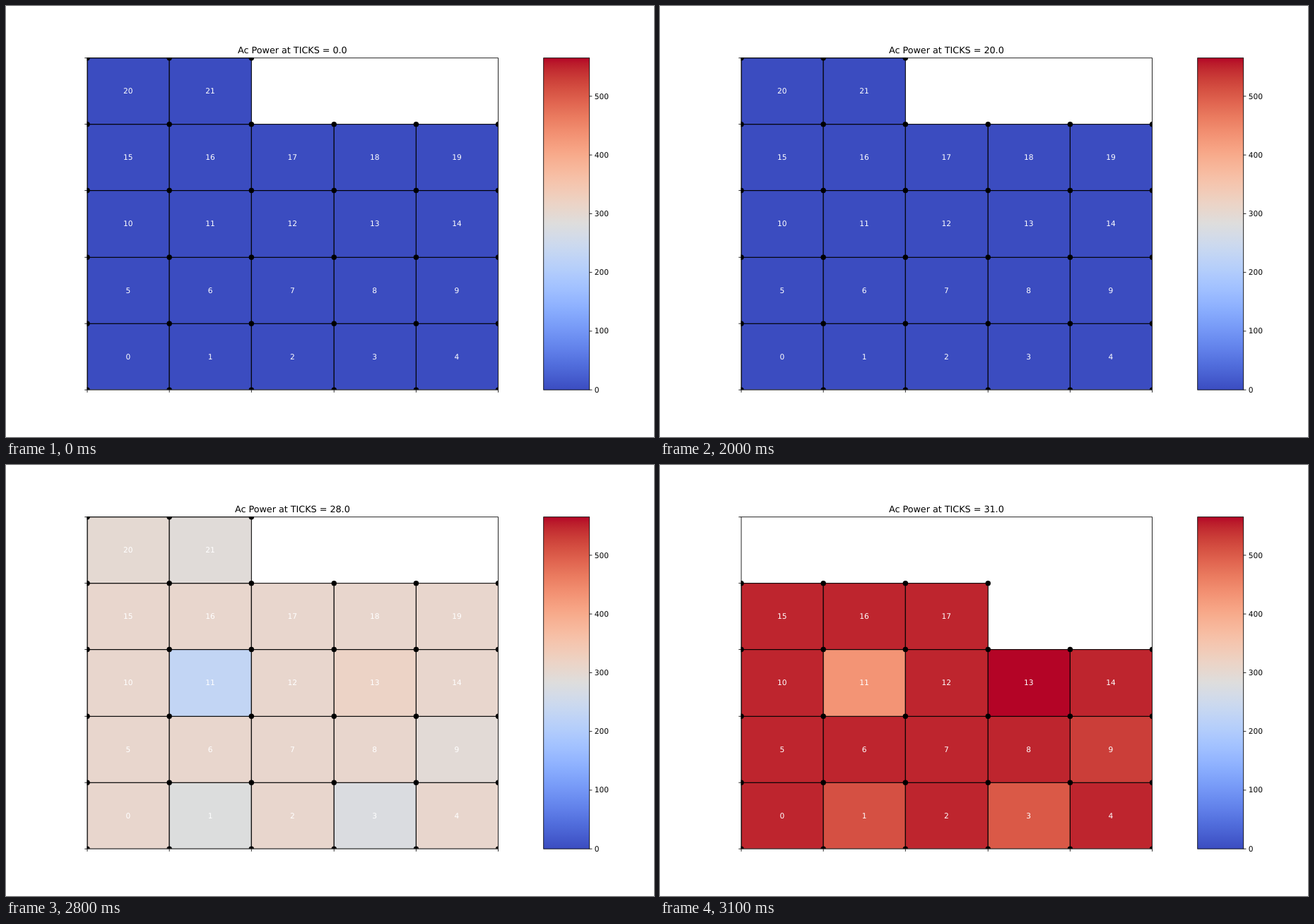
Write an HTML page that moves like this. It is 917x611 px and loops after 3200 ms.

```html
<!DOCTYPE html>
<html lang="en">
<head>
<meta charset="utf-8">
<title>Ac Power</title>
<style>
  html, body { margin: 0; width: 100%; height: 100%; overflow: hidden; background: #fff; }
  svg { display: block; width: 917px; height: 611px; }
  text { font: 13.89px "DejaVu Sans", sans-serif; text-anchor: middle; text-rendering: geometricPrecision; }
  #title { font-size: 16.67px; }
  .scale { text-anchor: start; }
  .cell text { fill: #fff; }
  .cell rect { stroke: #000; stroke-width: 1.39; }
  .axis { fill: none; stroke: #000; stroke-width: 1.11; }
</style>
</head>
<body>
<!-- Drawn on a 12 x 8 inch figure at 100 dpi, scaled to the stage -->
<svg viewBox="0 0 1200 800" preserveAspectRatio="none">
  <defs>
    <linearGradient id="ramp" x1="0" y1="1" x2="0" y2="0"></linearGradient>
    <clipPath id="plotArea"><rect x="150" y="96" width="761" height="616"/></clipPath>
  </defs>
  <g clip-path="url(#plotArea)"><g id="cells"></g><g id="dots"></g></g>
  <rect class="axis" x="150.5" y="96.5" width="761" height="616"/>
  <rect class="axis" x="995.5" y="96.5" width="85" height="616" style="fill:url(#ramp)"/>
  <g id="ticks"></g>
  <text id="title" x="530.45" y="87.7"></text>
</svg>
<script>
const TICK_MS = 100, TICKS = 32, MAX_POWER = 565.4;
const COLS = 5, ROWS = 5, CELLS = 22, CELLS_AT_END = 18;
const LEFT = 150, BOTTOM = 712, CELL_W = 152.18, CELL_H = 123.2;
const TICK_LENGTH = 4.86, TEXT_DROP = 5.07;

// Share of full power after sunrise, as [tick, share]
const sunrise = [[24, 0], [25, .03], [26, .106], [28, .562], [30, .845], [31, 1]];
// Loss at full power: most cells are alike, a few stand out
const usualLoss = .027;
const loss = { 1: .095, 3: .11, 9: .064, 11: .235, 13: 0, 20: .05, 21: .075 };

const byId = id => document.getElementById(id);
const mix = (a, b, t) => a + (b - a) * t;
const snap = v => Math.round(v) + .5;
const gridX = col => snap(LEFT + CELL_W * col);
const gridY = row => snap(BOTTOM - CELL_H * row);

function add(parent, tag, attrs, content = "") {
  const el = document.createElementNS("http://www.w3.org/2000/svg", tag);
  for (const key in attrs) el.setAttribute(key, attrs[key]);
  el.textContent = content;
  return parent.appendChild(el);
}

function labToRgb(L, a, b) {
  const cube = t => t > 6 / 29 ? t ** 3 : (t - 16 / 116) / 7.787;
  const fy = (L + 16) / 116;
  const x = .9505 * cube(fy + a / 500), y = cube(fy), z = 1.089 * cube(fy - b / 200);
  const linear = [
    3.2406 * x - 1.5372 * y - .4986 * z,
    -.9689 * x + 1.8758 * y + .0415 * z,
    .0557 * x - .204 * y + 1.057 * z
  ];
  const rgb = linear.map(c => c > .0031308 ? 1.055 * c ** (1 / 2.4) - .055 : 12.92 * c);
  return `rgb(${rgb.map(c => Math.round(255 * Math.max(0, Math.min(1, c))))})`;
}

// Diverging ramp in polar Lab: blue, through light grey, to red
function color(share) {
  const t = Math.abs(2 * share - 1);
  const size = mix(88, 80, t), tilt = 1.08 * t;
  const hue = share < .5 ? mix(-1.661, -1.1, t) : mix(1.061, .5, t);
  const chroma = size * Math.sin(tilt);
  return labToRgb(size * Math.cos(tilt), chroma * Math.cos(hue), chroma * Math.sin(hue));
}

function levelAt(tick) {
  const next = sunrise.findIndex(([t]) => t >= tick);
  if (next === 0) return 0;
  const [t0, a] = sunrise[next - 1], [t1, b] = sunrise[next];
  return mix(a, b, (tick - t0) / (t1 - t0));
}

for (let i = 0; i <= 64; i++) {
  add(byId("ramp"), "stop", { offset: i / 64, "stop-color": color(i / 64) });
}

const cells = Array.from({ length: CELLS }, (_, n) => {
  const col = n % COLS, row = Math.floor(n / COLS);
  const x = gridX(col), y = gridY(row + 1);
  const group = add(byId("cells"), "g", { class: "cell" });
  const rect = add(group, "rect", { x, y, width: gridX(col + 1) - x, height: gridY(row) - y });
  add(group, "text", {
    x: LEFT + CELL_W * (col + .5),
    y: BOTTOM - CELL_H * (row + .5) + TEXT_DROP
  }, n);
  return { group, rect, col, row, loss: loss[n] ?? usualLoss };
});

// A dot is present as soon as the first cell touching it is
const dots = [];
for (let row = 0; row <= ROWS; row++) {
  for (let col = 0; col <= COLS; col++) {
    const first = cells.findIndex(c =>
      (c.col === col || c.col + 1 === col) && (c.row === row || c.row + 1 === row));
    if (first < 0) continue;
    dots.push({ first, el: add(byId("dots"), "circle", { cx: gridX(col), cy: gridY(row), r: 4.86 }) });
  }
}

const addTick = d => add(byId("ticks"), "path", { class: "axis", d });
for (let i = 0; i <= COLS; i++) {
  addTick(`M${gridX(i)} ${gridY(0)}v${TICK_LENGTH}`);
  addTick(`M${gridX(0)} ${gridY(i)}h${-TICK_LENGTH}`);
}
for (let power = 0; power <= 500; power += 100) {
  const y = BOTTOM - CELL_H * ROWS * power / MAX_POWER;
  addTick(`M1080.5 ${snap(y)}h${TICK_LENGTH}`);
  add(byId("ticks"), "text", { class: "scale", x: 1089.7, y: y + TEXT_DROP }, power);
}

function draw(tick) {
  const count = tick === TICKS - 1 ? CELLS_AT_END : CELLS;
  const level = levelAt(tick);
  const show = (el, visible) => el.style.display = visible ? "" : "none";
  byId("title").textContent = `Ac Power at TICKS = ${tick.toFixed(1)}`;
  cells.forEach((cell, n) => {
    show(cell.group, n < count);
    cell.rect.setAttribute("fill", color(level - cell.loss * level ** .7));
  });
  dots.forEach(dot => show(dot.el, dot.first < count));
}

const start = performance.now();
let shown = -1;
function frame() {
  const tick = Math.floor((performance.now() - start) / TICK_MS) % TICKS;
  if (tick !== shown) draw(shown = tick);
  requestAnimationFrame(frame);
}
frame();
</script>
</body>
</html>
```
